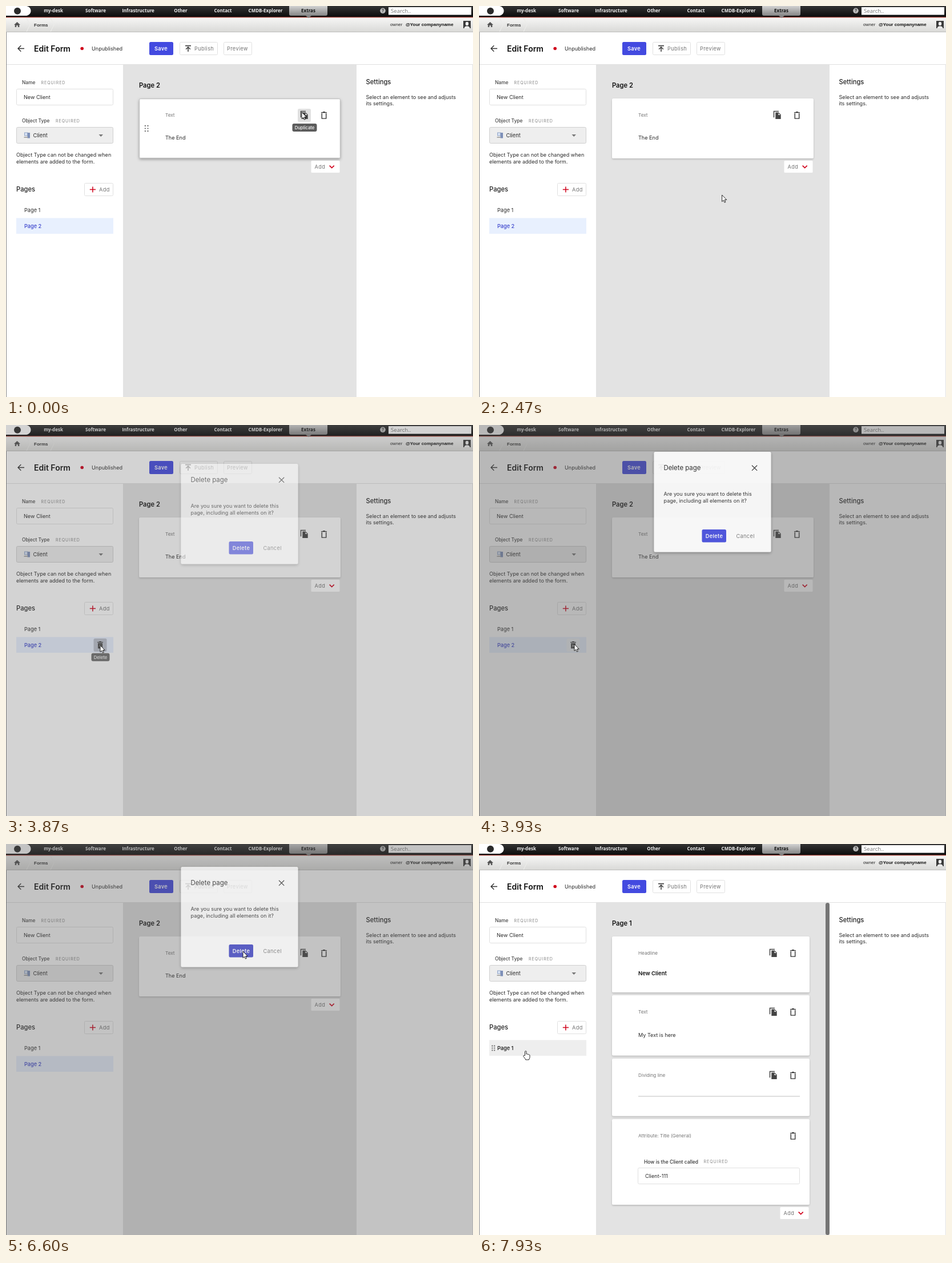
An HTML page that plays this animation: 818 by 685 pixels, repeating every 8000 ms.

```html
<!DOCTYPE html>
<html lang="en">
<head>
<meta charset="utf-8">
<title>Form editor</title>
<style>
  html, body { margin: 0; width: 100%; height: 100%; overflow: hidden; background: #fff; }
  svg { display: block; }
  #stage { width: 100vw; height: 100vh; }
  text { font-family: Inter, sans-serif; white-space: pre; }
  .menu { font-family: "Open Sans", sans-serif; }
  .crumb { font-family: "Liberation Sans", Arial, sans-serif; }
</style>
</head>
<body>
<svg id="stage" viewBox="0 0 818 685">
  <defs>
    <linearGradient id="bar" x2="0" y2="1"><stop stop-color="#333"/><stop offset="1" stop-color="#0c0c0c"/></linearGradient>
    <linearGradient id="tab" x2="0" y2="1"><stop stop-color="#d2d2d2"/><stop offset="1" stop-color="#858585"/></linearGradient>
    <linearGradient id="path" x2="0" y2="1"><stop stop-color="#f6f6f5"/><stop offset="1" stop-color="#d9d9d7"/></linearGradient>
    <filter id="soft" x="-5%" y="-10%" width="110%" height="125%"><feDropShadow dx="0" dy="1.5" stdDeviation="1.8" flood-opacity=".2"/></filter>
    <filter id="lift" x="-5%" y="-10%" width="110%" height="130%"><feDropShadow dx="0" dy="2" stdDeviation="2.4" flood-opacity=".32"/></filter>
  </defs>
  <g id="chrome"></g>
  <g id="scene"></g>
</svg>
<script>
const LOOP = 8000, STEPS = 120;
const BLUE = '#434ae0', RED = '#d0021b', INK = '#2b2b2b', GREY = '#757575', LINE = '#e0e0e0';
const $ = id => document.getElementById(id);
const clamp = v => Math.max(0, Math.min(1, v));
const smooth = u => u * u * (3 - 2 * u);

// drawing helpers
const text = (x, y, s, size = 9.1, fill = INK, weight = 400, more = '') =>
  `<text x="${x}" y="${y}" font-size="${size}" fill="${fill}" font-weight="${weight}" ${more}>${s}</text>`;
const rect = (x, y, w, h, fill, more = '') =>
  `<rect x="${x}" y="${y}" width="${w}" height="${h}" fill="${fill}" ${more}/>`;
const path = (d, fill, more = '') => `<path d="${d}" fill="${fill}" ${more}/>`;
const stroke = (d, color, w = 1.3) => path(d, 'none', `stroke="${color}" stroke-width="${w}"`);
const at = (x, y, body, more = '') => `<g transform="translate(${x} ${y})" ${more}>${body}</g>`;
const box = (x, y, w, h, fill = '#fff', line = LINE) =>
  rect(x + .5, y + .5, w, h, fill, `rx="2" stroke="${line}"`);
const label = (x, y, s) => text(x, y, s, 8.4, '#444', 500);
const required = (x, y) => text(x, y, 'REQUIRED', 7, '#858585', 400, 'letter-spacing="1"');
const caption = (x, y, s, fill = GREY, weight = 400) => text(x, y, s, 9.2, fill, weight, 'letter-spacing=".35"');

const dots = (x, y, s = 4.6) => {
  let out = '';
  for (let i = 0; i < 6; i++)
    out += rect(x + (i % 2 - .5) * s - 1.1, y + ((i >> 1) - 1) * s - 1.1, 2.2, 2.2, '#777', 'rx=".6"');
  return out;
};
const copyIcon = (x, y) => at(x, y,
  stroke('M-6 4.5V-6.3H2.5', '#444', 1.5) +
  path('M-3.2 -4.2H2.4L6.2 -.4V7.4H-3.2Z', '#444') +
  path('M2 -3V.2H5.2Z', '#fff'));
const binIcon = (x, y) => at(x, y,
  stroke('M-3.7 -3.2V5.8H3.7V-3.2', '#333', 1.4) +
  path('M-5 -5.4H-2.3L-1.5 -6.4H1.5L2.3 -5.4H5V-4H-5Z', '#333'));
const binFull = (x, y) => at(x, y,
  path('M-4 -3.2H4V6H-4ZM-5 -5.6H-2.3L-1.5 -6.6H1.5L2.3 -5.6H5V-4.2H-5Z', '#444') +
  stroke('M-1.9 -.6L1.9 3.2M1.9 -.6L-1.9 3.2', '#ddd', 1));
const tooltip = (cx, y, w, s, alpha) => alpha <= 0 ? '' :
  `<g opacity="${alpha}">${rect(cx - w / 2, y, w, 14, '#5c5c5c', 'rx="3"')}${
    text(cx, y + 9.8, s, 7.7, '#fff', 500, 'text-anchor="middle"')}</g>`;
const square = (x, y, fill, alpha = 1) =>
  rect(x - 11.5, y - 11.5, 23, 23, fill, `rx="2.5" opacity="${alpha}"`);
const addMenu = (x, y) =>
  rect(x, y, 50, 21, '#fff', 'rx="1.5"') + caption(x + 6, y + 14, 'Add') +
  stroke(`M${x + 32.2} ${y + 8.6}l4 4l4 -4`, RED, 1.7);

const CURSORS = {
  arrow: path('M0 0V11.6L2.7 9.2L4.4 13.2L6.3 12.4L4.6 8.5H8.2Z', '#fff', 'stroke="#111" stroke-width=".9"'),
  hand: path('M-1.5 7.6V.8C-1.5 -.8 1 -.8 1 .8V5.2C1.6 4.4 3 4.7 3.2 5.6C4 5 5 5.4 5.2 6.2C6.2 5.8 7 6.4 7 7.4V10.5C7 12.6 5.6 13.4 5.4 15H-.4C-.8 12.8 -2.6 11.6 -4 9.4C-4.9 7.8 -3.2 6.6 -2.2 7.6Z',
    '#fff', 'stroke="#111" stroke-width=".9"'),
  beam: stroke('M-2.5 -6.5H-.8L0 -5.7L.8 -6.5H2.5M0 -5.7V5.7M-2.5 6.5H-.8L0 5.7L.8 6.5H2.5', '#111', 1)
};

// pointer path: step, x, y, easing into this point
const quick = u => u ** 1.5, settle = u => 1 - (1 - u) ** 1.7;
const TRACK = [
  [0, 518, 186], [1, 519, 186], [16, 519, 186], [20, 515, 245, quick], [29, 554, 304, settle],
  [32, 554, 304], [45, 165, 386, smooth], [58, 165, 386], [59, 167, 384], [67, 329, 138, smooth],
  [69, 329, 138], [77, 414, 124, quick], [82, 444, 138, settle], [92, 415, 188, smooth],
  [109, 415, 188], [119, 82, 363, smooth]
];
function pointer(k) {
  const i = Math.max(1, TRACK.findIndex(p => p[0] >= k));
  const [k0, x0, y0] = TRACK[i - 1], [k1, x1, y1, ease = u => u] = TRACK[i];
  const u = ease((k - k0) / (k1 - k0));
  return { x: x0 + (x1 - x0) * u, y: y0 + (y1 - y0) * u };
}
const inside = (p, x, y, w, h) => p.x >= x && p.x < x + w && p.y >= y && p.y < y + h;

function chrome() {
  const menu = [[83, 'my-desk'], [157, 'Software'], [231.5, 'Infrastructure'], [306, 'Other'],
    [380, 'Contact'], [454.5, 'CMDB-Explorer'], [529.5, 'Extras']];
  return rect(0, 0, 818, 685, '#fff') +
    rect(0, 0, 818, 19, 'url(#bar)') + rect(0, 19, 818, 1.6, '#9c4138') +
    path('M0 0H36C46 2 46 15 36 17H0Z', '#fff') + '<circle cx="20" cy="8.7" r="6" fill="#2a2a2a"/>' +
    rect(0, 20.6, 818, 25, 'url(#path)') + rect(0, 45, 818, 1, '#bdbdbb') +
    path('M496 0H563V14Q563 17 560 17H499Q496 17 496 14Z', 'url(#tab)') +
    path('M525 17H535L530 21Z', '#858585') +
    menu.map(([x, s]) => text(x, 10.7, s, 8, s === 'Extras' ? '#111' : '#eee', 700, 'class="menu" text-anchor="middle"')).join('') +
    '<circle cx="660" cy="8.3" r="4.8" fill="#bbb"/>' + text(660, 11, '?', 7.5, '#333', 700, 'text-anchor="middle"') +
    rect(670, 2, 145, 13.5, '#fff') + text(674, 12.2, 'Search..', 9.6, '#777', 400, 'class="menu"') +
    path('M14 33L19.5 28L25 33H23.3V37H20.8V34H18.2V37H15.7V33Z', '#555') +
    stroke('M36 21L42 33L36 45M78 21L84 33L78 45', '#ececea', 1.2) +
    text(49, 35.7, 'Forms', 8, '#333', 700, 'class="crumb"') +
    text(673, 35.2, 'owner', 7.8, '#222', 400, 'class="crumb"') +
    text(700, 35.2, '@Your companyname', 8, '#111', 700, 'class="crumb"') +
    rect(801, 26, 13, 13, '#3a3a3a') + '<ellipse cx="807.5" cy="31" rx="2.7" ry="3.3" fill="#eee"/>' +
    path('M802.5 39Q803 35.5 807.5 35.2Q812 35.5 812.5 39Z', '#eee') +
    // page header
    stroke('M32 74.5H21.5M26.3 69.2L21 74.5L26.3 79.8', '#333', 1.4) +
    text(49, 79.6, 'Edit Form', 14, '#111', 600) +
    `<circle cx="133.2" cy="74.5" r="2.8" fill="${RED}"/>` + text(150, 77.9, 'Unpublished') +
    rect(251, 63, 42, 23, BLUE, 'rx="2.5"') + caption(260, 78, 'Save', '#fff', 600) +
    box(304, 63, 66, 22) +
    stroke('M314 69.6H324M319 80V72.5M315.2 75.8L319 72L322.8 75.8', '#444', 1.6) + caption(330, 78, 'Publish') +
    box(381, 63, 49, 22) + caption(387, 78, 'Preview') +
    // side panel
    label(28, 137, 'Name') + required(61.5, 136.7) + box(18, 145, 169, 28) + text(31, 163, 'New Client') +
    label(28, 204.3, 'Object Type') + required(87, 204) + box(18, 212, 169, 28, '#eee', '#cfcfcf') +
    rect(32, 221.5, 6.5, 6, '#8ea3c8') + rect(33, 222.5, 4.5, 4, '#dbe5f5') + rect(37.5, 222, 4.5, 9.5, '#7d8fb8') +
    rect(31.5, 229, 6.5, 2, '#aaa') + text(47.5, 230.3, 'Client', 9.3) +
    path('M162.5 225H170L166.2 229Z', '#777') +
    text(18, 264.2, 'Object Type can not be changed when') + text(18, 276, 'elements are added to the form.') +
    text(18, 324.6, 'Pages', 11.2, '#222', 500) + box(137, 310, 50, 22) +
    stroke('M146.8 321.5H157M151.9 316.4V326.6', RED, 1.5) + caption(163, 325, 'Add') +
    // canvas and settings
    rect(205, 103, 409, 582, '#e3e3e3') +
    rect(0, 102, 818, 1, LINE) + rect(817, 102, 1, 583, '#e2e2e2') + rect(0, 46, 1, 639, '#8a8a8a') +
    text(630.5, 136.8, 'Settings', 11.2, '#222', 450);
}

function card(x, y, w, h, kind, state = {}) {
  const right = x + w, frame = state.selected
    ? rect(x + 1, y + 1, w - 2, h - 2, '#fff', 'rx="2.5" stroke="#1a1a9c" stroke-width="2" filter="url(#soft)"')
    : state.hover
      ? rect(x + .7, y + .7, w - 1.4, h - 1.4, '#fff', 'rx="1.5" stroke="#bdbdbd" filter="url(#lift)"')
      : rect(x, y, w, h, '#fff', 'rx="2.5" filter="url(#soft)"');
  return frame + text(279, y + 31.8, kind, 8.2, GREY) +
    (state.grip ? dots(x + 13.2, y + 52.5) : '') + (state.under || '') +
    (state.single ? '' : copyIcon(right - 63.5, y + 28.7)) + binIcon(right - 29, y + 29.3);
}

function pageTwo(k, p) {
  const twin = k >= 9 && k < 30, open = k >= 58 && k < 102;
  const hover = !open && inside(p, 233, 162, 353, 105);
  const fade = clamp(1.3 - (k - 19) * .45);
  const onCopy = k < 23 ? clamp(k < 19 ? 1 : .5 - (k - 19) * .2) : 0;
  const press = k >= 9 && k < 14 ? '#c9c9c9' : LINE;
  let out = card(233, 162, 353, 105, 'Text', {
    hover, grip: hover && k < 100 || hover && k > 102, under: square(522.5, 191.5, press, onCopy)
  }) + text(279, 234.4, 'The End');
  if (twin) {
    const over = inside(p, 233, 273, 353, 105), bin = inside(p, 545, 291, 23, 23);
    out += card(233, 273, 353, 105, 'Text', {
      selected: true, grip: over, under: bin ? square(557, 302.5, LINE) : ''
    }) + text(279, 345.4, 'The End') + (bin ? tooltip(557, 317, 32, 'Delete', clamp((k - 24) / 4)) : '');
  }
  return out + addMenu(534.5, twin ? 382 : 271) + tooltip(523, 206, 43, 'Duplicate', k < 23 ? fade : 0);
}

function pageOne(p) {
  const hover = inside(p, 233, 162, 346, 98);
  return card(233, 162, 346, 98, 'Headline', { hover, grip: hover }) + text(279, 229.6, 'New Client', 9.5, '#111', 600) +
    card(233, 265, 346, 105.5, 'Text', { hover: inside(p, 233, 265, 346, 106) }) + text(279, 337.8, 'My Text is here') +
    card(233, 376, 346, 100.5, 'Dividing line') + rect(279, 441.5, 283, 1, '#bdbdbd') +
    card(233, 482, 346, 150, 'Attribute: Title (General)', { single: true }) +
    text(289, 559.5, 'How is the Client called', 8.5, '#333', 500) + required(393.5, 559.3) +
    box(278, 567, 283, 28) + text(291, 585.2, 'Client-111') +
    addMenu(527.5, 636) + rect(607, 103, 7, 582, '#757575', 'rx="3.5"');
}

function settings(k) {
  if (k < 9 || k >= 30)
    return text(630.5, 162.8, 'Select an element to see and adjusts') + text(630.5, 174, 'its settings.');
  return label(640.5, 165, 'Text') + box(630, 173, 170, 184) + text(640.5, 189, 'The End') +
    stroke('M784.5 351L790 345.5M787.5 351L790 348.5', '#777', .8) +
    rect(634, 366.8, 10, 10, '#fff', 'rx="1" stroke="#555" stroke-width="1.3"') +
    text(649, 375, 'Hide element for recipients', 8.75);
}

function pageList(k, p) {
  const hot = k > 106 && inside(p, 18, 344, 170, 27);
  let out = (hot ? rect(18, 343.5, 170, 27.5, '#eee') + dots(25.2, 357.5, 3.8) : '') +
    text(32, 360.7, 'Page 1', 9.2, INK, hot ? 600 : 400);
  if (k >= 106) return out;
  const h = 28 * (1 - smooth(clamp((k - 101) / 5))), focus = k >= 101;
  out += `<svg x="18" y="371.3" width="170" height="${h}">` + rect(0, 0, 170, h, '#e8f0fe') +
    text(14, h / 2 + 3.4, 'Page 2', 9.2, '#3a43cc', 500) +
    (focus ? dots(7.2, h / 2, 3.8) + rect(.75, .75, 168.5, Math.max(0, h - 1.5), 'none', 'stroke="#999" stroke-width="1.5"') : '') + '</svg>';
  if (k < 63 && inside(p, 18, 371, 170, 28)) {
    const pressed = k >= 55 && k < 59;
    out += square(165, 385.5, pressed ? '#bcc2ce' : k >= 59 ? '#f1f3f8' : '#d3dae8', pressed ? 1 : clamp((k - 43) / 4)) +
      binFull(165, 385.5) + tooltip(165.5, 399.7, 32, 'Delete', k < 59 ? .88 * clamp((k - 45) / 5) : 0);
  }
  return out;
}

function dialog(k, p) {
  const enter = 1 - (1 - clamp((k - 57) / 3)) ** 2;
  const alpha = k < 99 ? enter : clamp((102 - k) / 4);
  if (!alpha) return '';
  const hot = inside(p, 390, 176, 43, 22);
  return rect(0, 0, 818, 685, '#5a5a5a', `opacity="${alpha * .48}"`) +
    at(0, k < 99 ? 63 * (1 - enter) : 0,
      rect(306.5, 40, 205, 175.5, '#fff', 'rx="2.5" filter="url(#lift)"') +
      text(323.5, 72.2, 'Delete page', 11.4, '#222') +
      stroke('M478 63.7L487.2 72.9M487.2 63.7L478 72.9', '#333', 1.3) +
      text(323.5, 117.4, 'Are you sure you want to delete this') + text(323.5, 128.6, 'page, including all elements on it?') +
      rect(390.5, 176, 42.5, 22.5, hot ? '#373dc4' : BLUE, 'rx="2.5"') + caption(396.7, 191, 'Delete', '#fff', 600) +
      caption(450.5, 191, 'Cancel'), `opacity="${alpha}"`);
}

function shape(k, p) {
  if (k >= 68 && k < 99 && inside(p, 340, 108, 140, 24)) return 'beam';
  return k > 106 && inside(p, 18, 344, 170, 27) ? 'hand' : 'arrow';
}

function render(k) {
  const p = pointer(k), first = k >= 106;
  $('scene').innerHTML =
    text(233, 142.6, first ? 'Page 1' : 'Page 2', 11.2, '#111', 600) +
    (first ? pageOne(p) : pageTwo(k, p)) + settings(k) + pageList(k, p) + dialog(k, p) +
    at(p.x, p.y, CURSORS[shape(k, p)]);
}

$('chrome').innerHTML = chrome();
let shown = -1;
const start = performance.now();
function tick() {
  const t = (performance.now() - start) % LOOP;
  const k = Math.floor((t + 5) * STEPS / LOOP) % STEPS;
  if (k !== shown) render(shown = k);
  requestAnimationFrame(tick);
}
tick();
</script>
</body>
</html>
```
